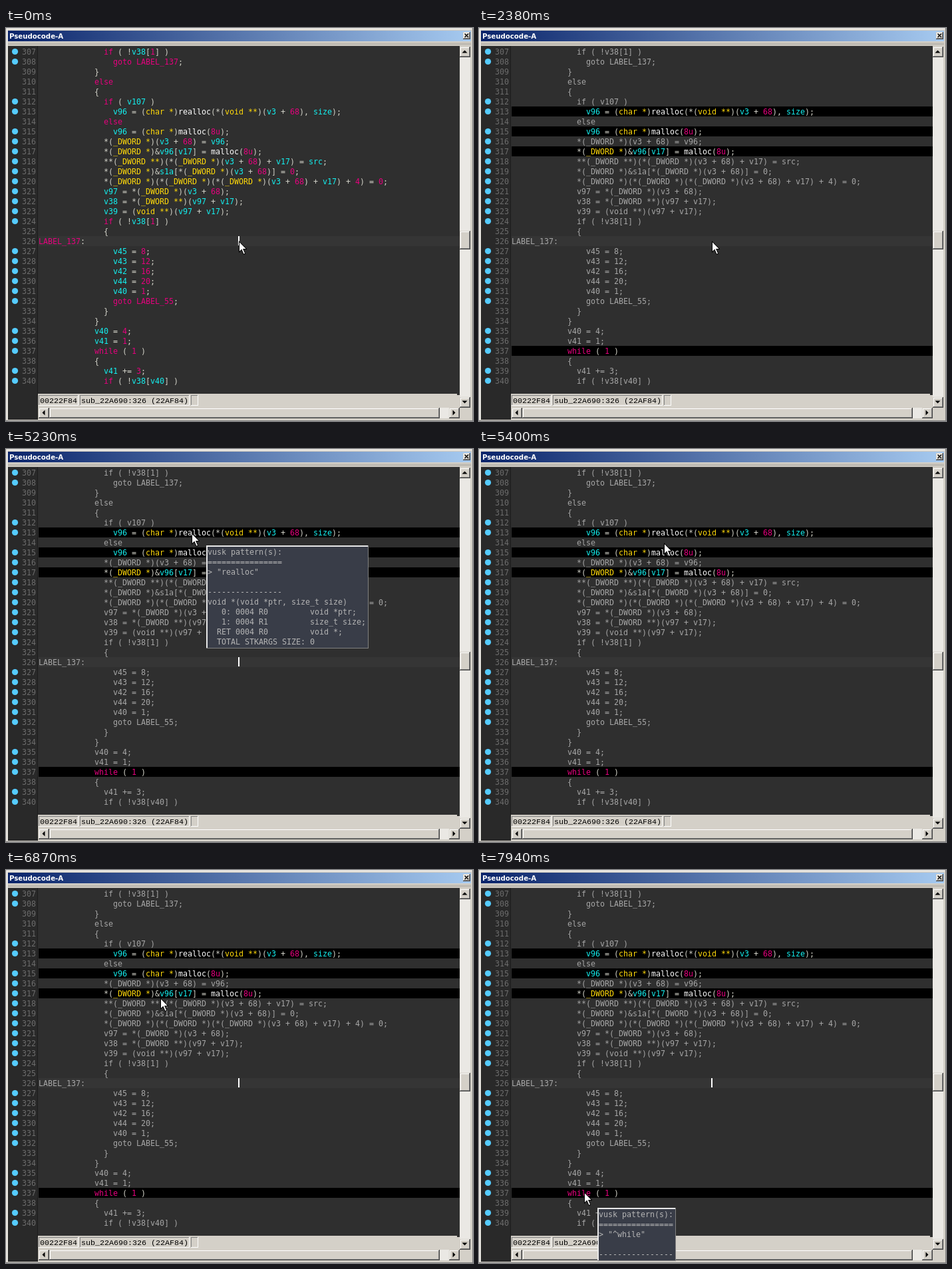
Animation, 702 px wide and 591 px high, one loop 8 s. Source, as an HTML page with a canvas:

```html
<!DOCTYPE html>
<html lang="en">
<head>
<meta charset="utf-8">
<title>Pseudocode view</title>
<style>
  html, body { margin: 0; width: 100%; height: 100%; overflow: hidden; background: #d4d0c8; }
  canvas { display: block; }
</style>
</head>
<body>
<canvas id="stage" width="702" height="591"></canvas>
<script>
const ctx = document.getElementById('stage').getContext('2d');
const LOOP = 8000, CHAR = 7, ROW = 15, FIRST_LINE = 307, CURRENT_LINE = 326;
const CODE_X = 49, CODE_Y = 28, CODE_RIGHT = 682;
const CODE_FONT = '11.63px "DejaVu Sans Mono", monospace';
const STATUS_FONT = '11.667px "Liberation Mono", monospace';
const FACE = '#d4d0c8', DIM = '#a6a6a6', PLAIN = '#d2d2c8';

const source = `
              if ( !v38[1] )
                goto LABEL_137;
            }
            else
            {
              if ( v107 )
                v96 = (char *)realloc(*(void **)(v3 + 68), size);
              else
                v96 = (char *)malloc(8u);
              *(_DWORD *)(v3 + 68) = v96;
              *(_DWORD *)&v96[v17] = malloc(8u);
              **(_DWORD **)(*(_DWORD *)(v3 + 68) + v17) = src;
              *(_DWORD *)&s1a[*(_DWORD *)(v3 + 68)] = 0;
              *(_DWORD *)(*(_DWORD *)(*(_DWORD *)(v3 + 68) + v17) + 4) = 0;
              v97 = *(_DWORD *)(v3 + 68);
              v38 = *(_DWORD **)(v97 + v17);
              v39 = (void **)(v97 + v17);
              if ( !v38[1] )
              {
LABEL_137:
                v45 = 8;
                v43 = 12;
                v42 = 16;
                v44 = 20;
                v40 = 1;
                goto LABEL_55;
              }
            }
            v40 = 4;
            v41 = 1;
            while ( 1 )
            {
              v41 += 3;
              if ( !v38[v40] )`.split('\n').slice(1);

const noDot = new Set([309, 310, 311, 314, 325, 326, 333, 334, 338]);
const matching = /alloc|while/;

const tokenColors = [
  [/^(char|void|_DWORD) /, '#ffd90a'],
  [/^(if|else|goto|while|LABEL_\d+|\d+u?)$/, '#e6007e'],
  [/^(re|m)alloc$/, '#ffffff'],
  [/^(v\d+|size|src|s1a)$/, '#14eeee'],
];
const tokenize = line =>
  [...line.matchAll(/(?:char|void|_DWORD) \*+|\w+|[^\w\s]+?/g)].map(m => ({
    text: m[0],
    col: m.index,
    color: (tokenColors.find(([pattern]) => pattern.test(m[0])) || [0, PLAIN])[1],
  }));
const lines = source.map((text, i) => ({
  text, number: FIRST_LINE + i, top: CODE_Y + i * ROW, tokens: tokenize(text), match: matching.test(text),
}));

const hint = (pattern, ...rest) =>
  ['vusk pattern(s):', '='.repeat(16), `> "${pattern}"`, '', '-'.repeat(16), ...rest];
const argument = (label, register, type) => `${label.padStart(5)} 0004 ${register}`.padEnd(22) + type;
const total = '  TOTAL STKARGS SIZE: 0';
const tooltips = [
  { from: 4190, to: 5300, x: 301, y: 145, w: 244, lines: hint('realloc',
    'void *(void *ptr, size_t size)', argument('0:', 'R0', 'void *ptr;'),
    argument('1:', 'R1', 'size_t size;'), argument('RET', 'R0', 'void *;'), total) },
  { from: 5700, to: 6820, x: 298, y: 175, w: 244, lines: hint('malloc',
    'void *(size_t size)', argument('0:', 'R0', 'size_t size;'),
    argument('RET', 'R0', 'void *;'), total) },
  { from: 7940, to: LOOP, x: 178, y: 508, w: 118, lines: hint('^while') },
];

const FILTER_ON = 2380;
const caretToggles = [350, 900, 1390, 1890, 2380, 2880, 3390, 3870,
  4300, 4860, 5350, 5830, 6320, 6820, 7310, 7760];

// time, x, y of the pointer tip
const pointerPath = [
  [0, 350, 320], [3300, 350, 320], [3450, 341, 290], [3750, 291, 150], [3940, 281, 120],
  [5200, 281, 120], [5230, 279, 126], [5520, 278, 151],
  [6780, 278, 151], [6870, 232, 192], [7150, 186, 330], [7450, 161, 446],
  [7610, 158, 473], [7760, 158, 484], [LOOP, 158, 484],
];

function rect(x, y, w, h, color) {
  ctx.fillStyle = color;
  ctx.fillRect(x, y, w, h);
}

function text(str, x, y, color, font = CODE_FONT) {
  ctx.font = font;
  ctx.fillStyle = color;
  ctx.fillText(str, x, y);
}

function polygon(points, color) {
  ctx.beginPath();
  points.forEach(([x, y]) => ctx.lineTo(x, y));
  ctx.closePath();
  ctx.fillStyle = color;
  ctx.fill();
}

function edges(x, y, w, h, light, dark) {
  rect(x, y, w, 1, light);
  rect(x, y, 1, h, light);
  rect(x, y + h - 1, w, 1, dark);
  rect(x + w - 1, y, 1, h, dark);
}

function raised(x, y, w, h) {
  rect(x, y, w, h, FACE);
  edges(x, y, w, h, FACE, '#404040');
  edges(x + 1, y + 1, w - 2, h - 2, '#ffffff', '#808080');
}

function arrowButton(x, y, angle) {
  raised(x, y, 16, 16);
  ctx.save();
  ctx.translate(x + 7.5, y + 7.5);
  ctx.rotate(angle);
  polygon([[-4, 2], [0, -2], [4, 2]], '#000');
  ctx.restore();
}

function drawWindow() {
  rect(0, 0, 702, 591, FACE);
  edges(0, 0, 702, 591, FACE, '#808080');
  edges(1, 1, 700, 589, '#ffffff', FACE);

  const title = ctx.createLinearGradient(3, 0, 699, 0);
  title.addColorStop(0, '#0a246a');
  title.addColorStop(1, '#a6caf0');
  rect(3, 4, 696, 16, title);
  text('Pseudocode-A', 5, 16, '#fff', 'bold 10.2px "DejaVu Sans", sans-serif');
  raised(687, 6, 11, 11);
  ctx.strokeStyle = '#000';
  ctx.lineWidth = 1.3;
  ctx.beginPath();
  ctx.moveTo(689.5, 8.5); ctx.lineTo(695, 14);
  ctx.moveTo(695, 8.5); ctx.lineTo(689.5, 14);
  ctx.stroke();
  rect(3, 22, 696, 4, '#c0bcb4');

  rect(3, 27, 45, 562, '#292929');
  rect(47, 27, 1, 562, '#1c1c1c');
  rect(48, 27, 634, 523, '#2f2f2f');
  rect(678, 550, 4, 2, '#2f2f2f');

  rect(682, 28, 16, 543, '#eae8e4');
  arrowButton(682, 28, 0);
  raised(682, 305, 16, 28);
  arrowButton(682, 555, Math.PI);

  for (const [x, w] of [[49, 60], [111, 165], [278, 11]]) edges(x, 552, w, 16, '#808080', '#ffffff');
  text('00222F84', 51, 564, '#000', STATUS_FONT);
  text('sub_22A690:326 (22AF84)', 113, 564, '#000', STATUS_FONT);

  rect(49, 571, 633, 16, '#eae8e4');
  arrowButton(49, 571, -Math.PI / 2);
  raised(65, 571, 587, 16);
  arrowButton(666, 571, Math.PI / 2);
}

function drawLine(line, filtered) {
  const baseline = line.top + 12;
  if (!noDot.has(line.number)) {
    ctx.beginPath();
    ctx.arc(13.5, line.top + 7.5, 4.6, 0, 7);
    ctx.fillStyle = '#55ccff';
    ctx.fill();
  }
  text(line.number, 24, baseline, '#6c6c6c');
  if (line.number === CURRENT_LINE) rect(CODE_X, line.top, CODE_RIGHT - CODE_X, ROW, '#353535');
  if (filtered && line.match) rect(CODE_X, line.top, CODE_RIGHT - CODE_X, ROW, '#000');
  for (const { text: str, col, color } of line.tokens)
    text(str, CODE_X + col * CHAR, baseline, filtered && !line.match ? DIM : color);
}

function drawTooltip({ x, y, w, lines }) {
  const h = lines.length * ROW + 5;
  rect(x, y, w, h, '#393d48');
  edges(x, y, w, h, '#e8e8e8', '#808080');
  rect(x, y + 1, w - 1, 1, '#e8e8e8');
  rect(x + 1, y, 1, h - 1, '#e8e8e8');
  lines.forEach((str, i) => text(str, x + 2, y + 14 + i * ROW, '#b4b4b4'));
}

function pointerAt(t) {
  const next = Math.max(1, pointerPath.findIndex(([time]) => time > t));
  const [t0, x0, y0] = pointerPath[next - 1], [t1, x1, y1] = pointerPath[next];
  const k = (t - t0) / (t1 - t0);
  return [Math.round(x0 + (x1 - x0) * k), Math.round(y0 + (y1 - y0) * k)];
}

function drawPointer([x, y]) {
  ctx.save();
  ctx.translate(x, y);
  polygon([[0, 0], [0, 18], [4, 14.5], [7, 21], [10, 20], [7.5, 13], [12, 13], [12, 12]], '#000');
  polygon([[1, 2.2], [1, 15.8], [4.3, 12.6], [7.4, 19.7], [9, 19], [6, 12], [10.6, 12]], '#fff');
  ctx.restore();
}

function draw(t) {
  drawWindow();
  lines.forEach(line => drawLine(line, t >= FILTER_ON));
  if (caretToggles.filter(time => time <= t).length % 2 === 0) rect(349, 313, 2, 14, '#fff');
  tooltips.filter(tip => t >= tip.from && t < tip.to).forEach(drawTooltip);
  drawPointer(pointerAt(t));
}

const start = performance.now();
function tick() {
  draw((performance.now() - start) % LOOP);
  requestAnimationFrame(tick);
}
tick();
</script>
</body>
</html>
```
